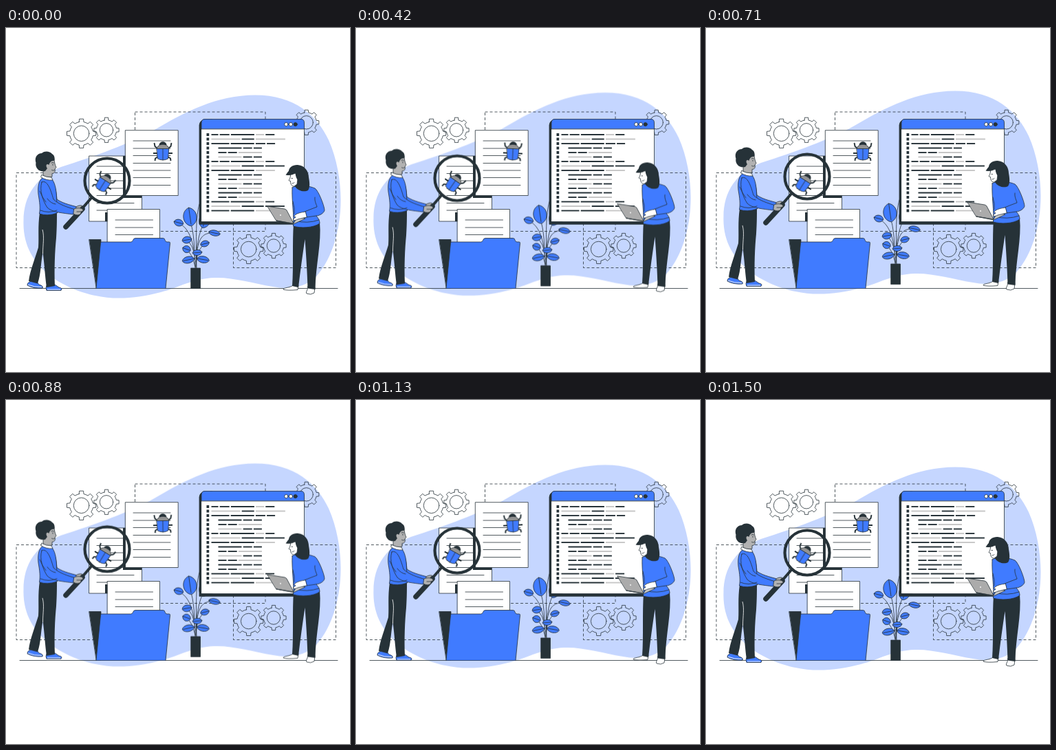
Animation of 500 by 500 pixels, one loop 1.54 s. Source, as an HTML page:

```html
<!DOCTYPE html>
<html lang="en">
<head>
<meta charset="utf-8">
<title>Bug hunt</title>
<style>
  html, body { margin: 0; width: 100%; height: 100%; overflow: hidden; background: #fff; }
  svg { display: block; width: 100vw; height: 100vh; }
  .blue { fill: #407bff; }
  .dark { fill: #263238; }
  .skin { fill: #b2b2b2; }
  .white { fill: #fff; }
  .line { stroke: #263238; stroke-width: .8; stroke-linejoin: round; stroke-linecap: round; }
  .none { fill: none; }
  .dash { fill: none; stroke: #263238; stroke-width: .8; stroke-dasharray: 4 3; }
  .float { animation: float 1540ms linear infinite; }
  .sway { animation: sway 1540ms linear infinite; }
  /* 1.5 s cycle followed by one held step */
  @keyframes float {
    0%, 97.4%, 100% { transform: translateY(0); }
    48.7% { transform: translateY(-6.4px); }
  }
  @keyframes sway {
    0%, 97.4%, 100% { transform: rotate(0deg); }
    24.35% { transform: rotate(3deg); }
    73.05% { transform: rotate(-3deg); }
  }
</style>
</head>
<body>
<svg viewBox="0 0 500 500" xmlns="http://www.w3.org/2000/svg">
  <defs>
    <clipPath id="sheet"><path d="M121 186h76v95h-76z"/></clipPath>
    <g id="bug">
      <path class="none" stroke="#263238" stroke-width="1.9" d="M-8 -5L-11.500 -8L-12.500 -13M8 -5L11.500 -8L12.500 -13M-8 2H-14M8 2H14M-7 7L-11 9.500L-11.500 13M7 7L11 9.500L11.500 13"/>
      <path class="dark" d="M-5.500 -10C-5 -16.500 5 -16.500 5.500 -10z"/>
      <path class="line" fill="#929292" d="M-8.800 -4.500C-8 -13 8 -13 8.800 -4.500z"/>
      <path class="blue line" d="M-8.800 -4.500H8.800L7.500 10Q0 14 -7.500 10zM0 -4.500V12"/>
    </g>
  </defs>

  <path class="float" fill="#c5d6ff" d="M25.500 280C25.500 244 44 216 80 202C130 186 180 168 215 148.500C262 121 306 98 362 97.500C420 97.500 452 127 469 163C481 190 486.500 222 486.500 250C486.500 293 474 335 452 360C436 377 412 381 388 376C358 371 330 362 303 363C272 364 252 377 225 384C195 392 160 396 130 389C88 380 23 350 25.500 280z"/>

  <path class="dash" d="M187.500 122H377V295.500H187.500zM15 210.500H164V348.500H15zM330.500 210.500H479.500V348.500H330.500z"/>
  <g id="gears" class="line none"></g>
  <path class="line none" d="M20 378.500H482"/>

  <!-- papers and folder -->
  <path class="white line" d="M121 186h76.500v95h-76.500z"/>
  <path class="line none" d="M132 201h54M132 211.500h54M132 222h54M132 233h54M132 243.500h54M132 254.500h54M132 265h54"/>
  <g clip-path="url(#sheet)" class="dark"><path d="M170 153h76v94h-76zM144 268h76v94h-76z"/></g>
  <path class="white line" d="M173.700 148.700h76.500v94.800h-76.500z"/>
  <path class="line none" d="M185 164h54M185 175h54M185 185.500h54M185 196.500h54M185 207h54M185 217.500h54M185 228.500h54"/>
  <g transform="translate(228 180)"><use class="sway" href="#bug"/></g>
  <g transform="translate(142 225.500) rotate(32)"><use class="sway" href="#bug"/></g>
  <path class="dark line" d="M121 307.500H138V378H131.500z"/>
  <path class="white line" d="M147.500 263.500h76V320h-76z"/>
  <path class="line none" d="M159 279h54.500M159 290h54.500M159 300.500h54.500"/>
  <path class="blue line" d="M131 378.500L137.500 312.500Q137.700 311 139 311H181.500Q183.500 311 184.500 308.500Q185.500 305.500 188 305.500H228.500Q230.500 305.500 231.200 308.500Q232 311 234 311H237Q238.700 311 238.500 312.500L232 378.500z"/>

  <!-- plant -->
  <g class="float">
    <path class="line none" d="M275 350C274 322 274 298 267 278M276 350C276 320 279 300 289 280M277 350C276 300 276 275 281 256M274 330C271 302 262 288 251 284M277 335C278 305 286 297 302 298M275 335Q272 314 263 309M276 340Q280 318 289 314M275 347Q270 326 262 322M276 347Q277 335 278 327"/>
    <g id="leaves"></g>
    <path class="dark line" d="M269 349h13.500v29.500H269z"/>
  </g>

  <!-- code window -->
  <path class="dark line" d="M281 285V141Q281 136 287 133H300V282H433V285z"/>
  <path class="white line" d="M284 146H433.500V281.500H284z"/>
  <path class="blue line" d="M284 146.500V138Q284 132.500 289 132.500H429Q433.500 132.500 433.500 138V146.500z"/>
  <g class="white line"><circle cx="407.300" cy="140" r="2.600"/><circle cx="414" cy="140" r="2.600"/><circle class="dark" cx="420.700" cy="140" r="2.600"/></g>
  <g id="code" fill="none" stroke-width="1.900"></g>

  <!-- woman -->
  <g class="float">
    <path class="white line" d="M417 374C413 378 403 377 403 380Q409 382 424 380.500L425 374zM438.500 376C439 382 435 383 437 386Q443 388.500 448 385L449 377z"/>
    <path class="dark" d="M418 284C416 312 418 346 416 375L425 377C428 352 431 330 434.500 307C436.500 334 438 360 438.500 378.500L449.500 380C450 345 459 312 456 282z"/>
    <path class="blue line" d="M416 232C422 227 440 229 449 233C454 236 463 259 463 265C462 270 454 273 451 273C454 277 456 279 456 284C446 291 428 291 417.500 288C419 273 415 250 416 232z"/>
    <path class="line none" d="M449 246C448 252 452 258 452 260Q441 264 434 267M451 273L437 275M419 280Q438 285 455 279M417 252Q420 262 419 270"/>
    <path class="dark" d="M411 210C410 202 418 198.500 424 199C435 200 440 209 440 217C441.500 225 442 232 439 236C434 239 424 237 420 230z"/>
    <path class="white line" d="M413.500 212C413.500 216 413 219 411 221.500Q412 222.500 413.500 222.500C413.500 228 416 230.500 419 230L423 227L425 211z"/>
    <path class="dark" d="M406.500 213.500C412 215 417 213.500 420.500 211C421 216 422.500 220 425 221.500C424 227 425.500 232 429 236L437 235L436 208L424 201C414 202 411 208 406.500 213.500z"/>
    <path class="line none" d="M415 218.500h1.500M416 226Q418 226.500 419 224.500"/>
    <path class="line" fill="#ababab" d="M380 259L405 263Q407 263.500 408 265L418 284L393 280z"/>
    <path class="line" fill="#c9c9c9" d="M393 280L418 285L435 277L424 274L418 284z"/>
    <path class="white line" d="M435 267C429 268 422 269 418.500 273.500L421 275L417 278Q419 281 424 278L437 275z"/>
    <circle class="white" cx="399" cy="272" r=".9"/>
  </g>

  <!-- man -->
  <g class="float">
    <path class="blue line" d="M36 368C33 370 31 370 31 374Q40 379 53 378Q55 375 48 373L45 369zM59 374Q57 378 59 381.500H80Q83 378 77 377L71 373z"/>
    <path class="none" stroke="#fff" stroke-width=".9" d="M32 373Q41 377 52 376.500M60 380H79"/>
    <path class="dark" d="M49 268C46 290 48 302 47 319C42 336 35 352 33 368L46 371.500C51 356 50 346 53.500 326C56 345 57 363 59 377L71 375C70 350 71 325 73 305C74 290 74 278 74 268z"/>
    <path class="none" stroke="#fff" stroke-width=".8" d="M53 293C56 304 53.500 314 53.500 328"/>
    <path class="blue line" d="M64 220C70 224 73 234 74 249C84 256 98 258 106 261L103 268C92 266 82 264 72 258z"/>
    <path class="skin line" d="M102 260C106 257 112 257 113 261C113 265 108 267 103 266z"/>
    <circle class="none" cx="147" cy="222" r="32.500" stroke="#263238" stroke-width="4.200"/>
    <g stroke="#263238" stroke-linecap="round"><path stroke-width="4" d="M124 247L111 262"/><path stroke-width="7.500" d="M111 263L87 289"/></g>
    <path class="blue line" d="M54 217C47 221 46 231 47 242C49 253 50 262 48.500 270Q60 274 74.500 269C74 261 74 254 73.500 247C73 233 71 224 66 219z"/>
    <path class="blue line" d="M52 224C60 220 65 235 69 249C77 257 91 261 101 264L98 271C83 269 67 268 60 261C54 252 48 236 52 224z"/>
    <path class="line none" d="M50 265Q62 270 74 265M60 248Q65 255 72 256M49 237Q53 247 58 253"/>
    <path class="skin line" d="M99 263C103 261 109 261 112 264Q113 266 109 267C110 271 104 274 98 270z"/>
    <path class="line none" d="M103 267L109 267"/>
    <path class="skin line" d="M54 204L54 215Q60 219 67 216V211.500C71 211.500 72 208 71 205L73 202.500C71 199 70.500 195 70 190L57 190z"/>
    <path class="white line" d="M52 213.500Q58 217 66 217L68 221Q59 222 51 217z"/>
    <path class="dark" d="M57 208C48 210 42 203 43.500 196C41 189 45 182 52 182C56 178 64 179 67 183C71 185 71.500 191 69.500 193C66 193 64 194 62.500 199C59 196 57 200 60 204z"/>
    <path class="line none" d="M68 198v1.500M66 196Q68 194.500 69.500 196M66.500 206.500Q68.500 208 70.500 206.500"/>
  </g>
</svg>
<script>
  const add = (id, tag, attrs) => {
    const el = document.createElementNS("http://www.w3.org/2000/svg", tag);
    for (const k in attrs) el.setAttribute(k, attrs[k]);
    document.getElementById(id).append(el);
  };

  function gear(x, y, r) {
    const root = r * .8, step = Math.PI / 4;
    const at = (rad, a) => `${x + rad * Math.sin(a)} ${y - rad * Math.cos(a)}`;
    let d = "";
    for (let i = 0; i < 8; i++) {
      const a = i * step;
      d += (i ? `A${root} ${root} 0 0 1 ` : "M") + at(root, a - .2);
      d += `L${at(r, a - .14)}L${at(r, a + .14)}L${at(root, a + .2)}`;
    }
    add("gears", "path", { d: `${d}A${root} ${root} 0 0 1 ${at(root, -.2)}z` });
    add("gears", "circle", { cx: x, cy: y, r: r * .53 });
  }
  [[109.6, 153.3, 21.3], [146, 148.3, 18.3], [436.7, 137.3, 18.3], [352.7, 321.5, 21.3], [389, 316.5, 18.3]]
    .forEach(g => gear(...g));

  // x, y, half length, half width, angle
  const leaves = [
    [267.5, 274.5, 13.5, 9.5, 82], [289, 279, 12, 8, 105], [251, 283, 7, 4.8, 15], [303, 298, 8.5, 4, 12],
    [263, 308, 7, 4.8, 170], [289, 313.5, 6.5, 4.3, 165], [262.5, 321.5, 6, 5, 20], [278, 326.5, 7, 4, 175],
    [265, 337, 9, 4.8, 168], [286.5, 336.5, 9, 4.8, 10]
  ];
  for (const [x, y, a, b, turn] of leaves)
    add("leaves", "path", {
      class: "blue line", transform: `translate(${x} ${y}) rotate(${turn})`,
      d: `M${-a} 0C${-a * .7} ${-b * 1.35} ${a * .7} ${-b * 1.35} ${a} 0C${a * .7} ${b * 1.35} ${-a * .7} ${b * 1.35} ${-a} 0H${a * .8}`
    });

  // d: dark, l: light, number: length, >: indent
  const full = "d10 d14 d34 l12 d13", wide = "d26 d34 l12 d13", long = "l42 d32 d28", short = "d26 d34 l28";
  const pair = "> d12 d13 l34", tail = "> d34 d13 d12", pale = "> l34 d13 d12";
  const rows = [
    full, "l42 d18 l43", "d26 d34 d14 d12", tail, pair, pale, full, long, short,
    tail, pair, pale, pair, tail, pair, wide, long, short
  ];
  rows.forEach((row, i) => {
    const y = 155 + i * 6.5;
    let x = 298.5;
    add("code", "path", { d: `M291.500 ${y}h3.700`, stroke: "#263238", "stroke-width": 4 });
    for (const part of row.split(" ")) {
      if (part === ">") { x += 10; continue; }
      const len = +part.slice(1);
      add("code", "path", { d: `M${x} ${y}h${len}`, stroke: part[0] === "d" ? "#263238" : "#c7c7c7" });
      x += len + 2.2;
    }
  });
</script>
</body>
</html>
```
